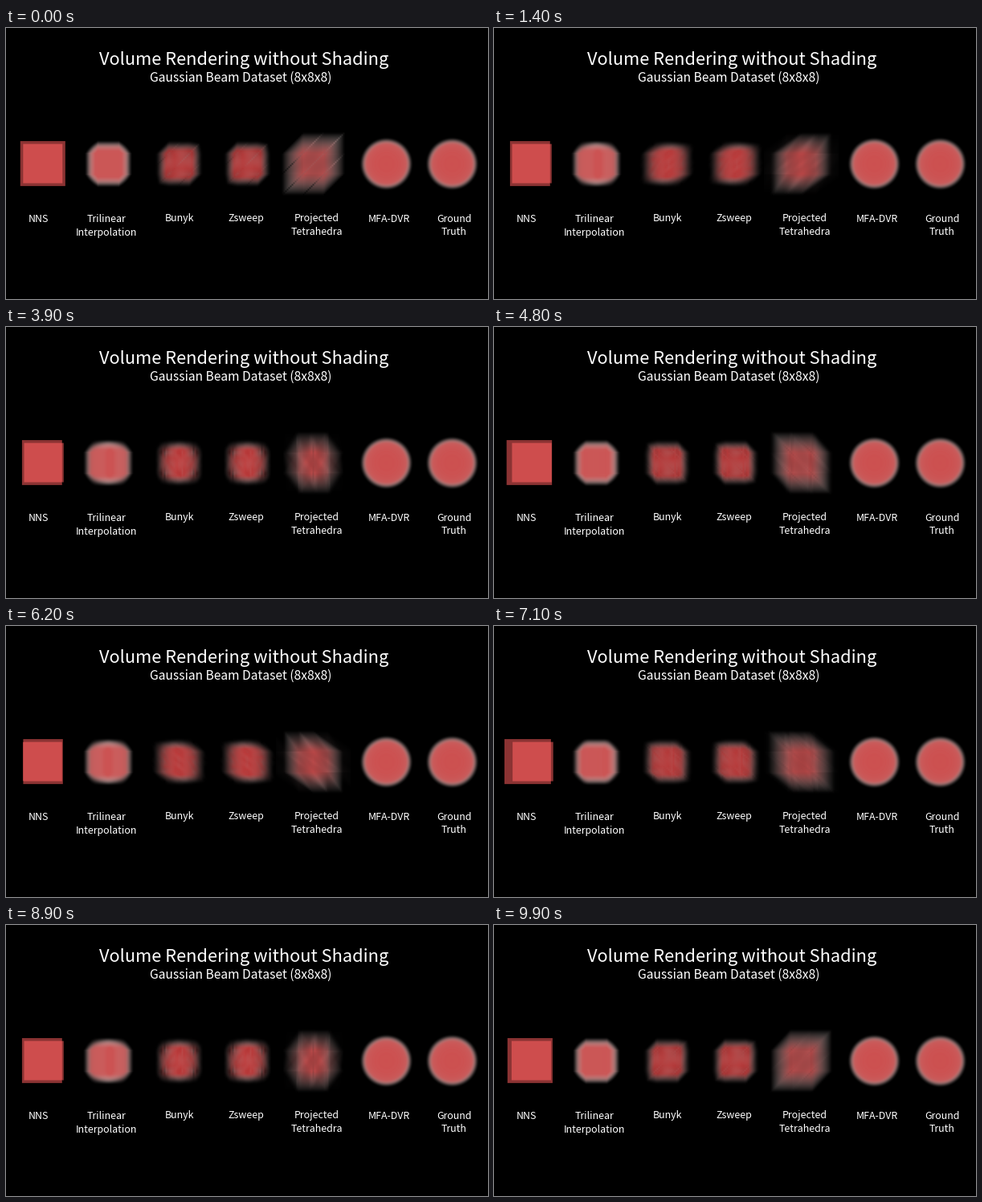
A matplotlib script that plays this animation: 600 by 338 pixels, repeating every 10000 ms.

```python
from functools import lru_cache
from itertools import permutations, product

import matplotlib.pyplot as plt
import numpy as np
from matplotlib.animation import FuncAnimation

W, H, FRAMES = 600, 338, 100
CELL = 26.0          # pixels per grid cell
HALF = 46            # half size of one rendered tile
MID_Y = 169
FALLOFF = 0.7        # gaussian exponent
GREY = np.array([190, 180, 178.0])
RED = np.array([207, 64, 64.0])
BRIGHT = np.array([206, 77, 77.0])
DARK = np.array([139, 51, 51.0])

pix = np.arange(-HALF, HALF + 1)
axis = (pix / CELL).astype(np.float32)
depths = np.linspace(1.6, -1.6, 32, dtype=np.float32)


def ramp(f, lo, hi):
    return np.clip((f - lo) / (hi - lo), 0, 1)


def composite(tau, mix, ax):
    """Front-to-back blend; returns opacity and the red share of it."""
    before = np.cumsum(tau, axis=ax) - tau
    weight = np.exp(-before) * (1 - np.exp(-tau))
    return weight.sum(ax), (weight * mix).sum(ax)


def colour(opacity, red):
    return opacity[..., None] * GREY + red[..., None] * (RED - GREY)


def march(f):
    w = ramp(f, 0.5, 0.9)
    step = depths[0] - depths[1]
    return colour(*composite(0.16 * CELL * step * w * w, w ** 1.5, 2))


# Smooth gaussian ball, the same from every side
r2 = (axis[:, None, None] ** 2 + axis[None, :, None] ** 2
      + depths[None, None, :] ** 2)
BALL = march(np.exp(-FALLOFF * (r2 - 0.75)))

# Gaussian on grid nodes, linear in between
nodes = np.arange(4) + 0.5
heights = np.exp(-FALLOFF * (nodes ** 2 - 0.25))


def lerp(x):
    return np.interp(np.abs(x), nodes, heights).astype(np.float32)


def trilinear(c, s):
    x, d = axis[:, None], depths[None, :]
    plane = lerp(x * c - d * s) * lerp(x * s + d * c)
    return march(lerp(axis)[:, None, None] * plane[None])


# Six tetrahedra for each of the 3x3x3 inner cells
def tetrahedra():
    tets = []
    for corner in product((-1.5, -0.5, 0.5), repeat=3):
        for order in permutations(range(3)):
            p = np.array(corner)
            tet = [p.copy()]
            for k in order:
                p[k] += 1
                tet.append(p.copy())
            tets.append(tet)
    return np.array(tets)


TETS = tetrahedra()
CENTRES = TETS.mean(1)
NODE_F = np.exp(-FALLOFF * ((TETS ** 2).sum(2) - 0.75))
homog = np.concatenate([TETS, np.ones(TETS.shape[:2] + (1,))], axis=2)
GRAD = np.linalg.inv(homog.transpose(0, 2, 1))   # barycentric gradients
F_LOW = np.exp(-2 * FALLOFF)

coarse = axis[::2]
upsample = np.array([np.interp(pix, pix[::2], row)
                     for row in np.eye(len(coarse))]).T


def enlarge(img):
    return np.stack([upsample @ img[..., k] @ upsample.T for k in range(3)], -1)


def tet_views(c, s):
    """Sorted cell-by-cell rendering, and the projected approximation."""
    depth = -CENTRES[:, 0] * s + CENTRES[:, 2] * c
    order = np.argsort(-depth, kind="stable")
    g, v = GRAD[order], NODE_F[order]
    gx = g[..., 0] * c + g[..., 2] * s
    gd = g[..., 2] * c - g[..., 0] * s
    gd = np.where(np.abs(gd) < 1e-5, 1e-5, gd)
    gy, g0 = g[..., 1], g[..., 3]

    def grid(a, b, k):
        a, b, k = (q.astype(np.float32)[..., None, None] for q in (a, b, k))
        return a * coarse + b * -coarse[:, None] + k

    hit = grid(-gx / gd, -gy / gd, -g0 / gd)
    ahead = (gd > 0)[..., None, None]
    lo = np.where(ahead, hit, -1e4).max(1)
    hi = np.where(ahead, 1e4, hit).min(1)
    length = np.clip(hi - lo, 0, 4)

    def total(q):
        return (q * v).sum(1)

    mid = np.where(length > 0, (lo + hi) / 2, 0)
    f = grid(total(gx), total(gy), total(g0))
    f = f + total(gd).astype(np.float32)[:, None, None] * mid

    w = ramp(f, 0.5, 0.9)
    exact = colour(*composite(0.05 * CELL * w * w * length, w ** 1.5, 0))

    # Opacity taken at the thickest point, then faded linearly
    flat = length.reshape(len(g), -1)
    peak = flat.argmax(1)
    rows = np.arange(len(g))
    thick = np.maximum(flat[rows, peak], 1e-6)
    wt = ramp(f.reshape(len(g), -1)[rows, peak], 0.3, 0.9)
    alpha = 1 - np.exp(-0.05 * CELL * wt * wt * thick)
    tau = -np.log1p(-(alpha / thick)[:, None, None] * length)
    rough = colour(*composite(tau, ramp(f, F_LOW, 1), 0))
    return enlarge(exact), enlarge(rough)


def cover(lo, hi, start, n):
    i = start + np.arange(n)
    return np.clip(np.minimum(hi, i + 1) - np.maximum(lo, i), 0, 1)


def slab(c, s, depth, zoom):
    """Screen-parallel slice through the turning cube."""
    size, lo, hi = 26.2, -99.0, 99.0
    for k, off in ((c, -depth * s), (s, depth * c)):
        if abs(k) > 1e-6:
            lo = max(lo, -off / k - size / abs(k))
            hi = min(hi, -off / k + size / abs(k))
    cols = cover(45.8 + lo * zoom, 45.8 + hi * zoom, 0, W)
    y = MID_Y + 0.1
    rows = cover(y - size * zoom, y + size * zoom, MID_Y - HALF, len(pix))
    return rows[:, None] * cols


def nearest(c, s):
    front = slab(c, s, 14, 1.07)
    back = slab(c, s, -11, 0.935)
    either = np.maximum(front, back)[..., None]
    return either * DARK + (front * back)[..., None] * (BRIGHT - DARK)


@lru_cache(maxsize=None)
def render(i):
    a = 2 * np.pi * i / FRAMES
    c, s = np.cos(a), np.sin(a)
    strip = nearest(c, s)
    exact, rough = tet_views(c, s)
    tiles = ((127, trilinear(c, s)), (215, exact), (300, exact),
             (382, rough), (473, BALL), (555, BALL))
    for x, tile in tiles:
        left, right = x - HALF, min(x + HALF + 1, W)
        part = strip[:, left:right]
        np.maximum(part, tile[:, :right - left], out=part)
    return np.clip(strip, 0, 255).astype(np.uint8)


fig = plt.figure(figsize=(W / 100, H / 100), dpi=100, facecolor="black")
ax = fig.add_axes([0, 0, 1, 1])
ax.axis("off")
view = ax.imshow(render(0), extent=(0, W, MID_Y + HALF + 1, MID_Y - HALF),
                 interpolation="nearest", aspect="auto")
ax.set_xlim(0, W)
ax.set_ylim(H, 0)


def label(x, y, text, px):
    ax.text(x, y, text, color="white", fontsize=px * 0.72, ha="center",
            va="baseline", family="Noto Sans CJK JP")


label(296, 46, "Volume Rendering without Shading", 21.8)
label(292, 67, "Gaussian Beam Dataset (8x8x8)", 15.6)
for x, words in ((40.5, "NNS"), (125, "Trilinear Interpolation"), (216, "Bunyk"),
                 (299, "Zsweep"), (387, "Projected Tetrahedra"),
                 (477, "MFA-DVR"), (558, "Ground Truth")):
    for row, word in enumerate(words.split()):
        label(x, 241.5 + 17 * row, word, 12.4)


def update(i):
    view.set_data(render(i))
    return [view]


anim = FuncAnimation(fig, update, frames=FRAMES, interval=100,
                     repeat=True, repeat_delay=0)
plt.show()
```
